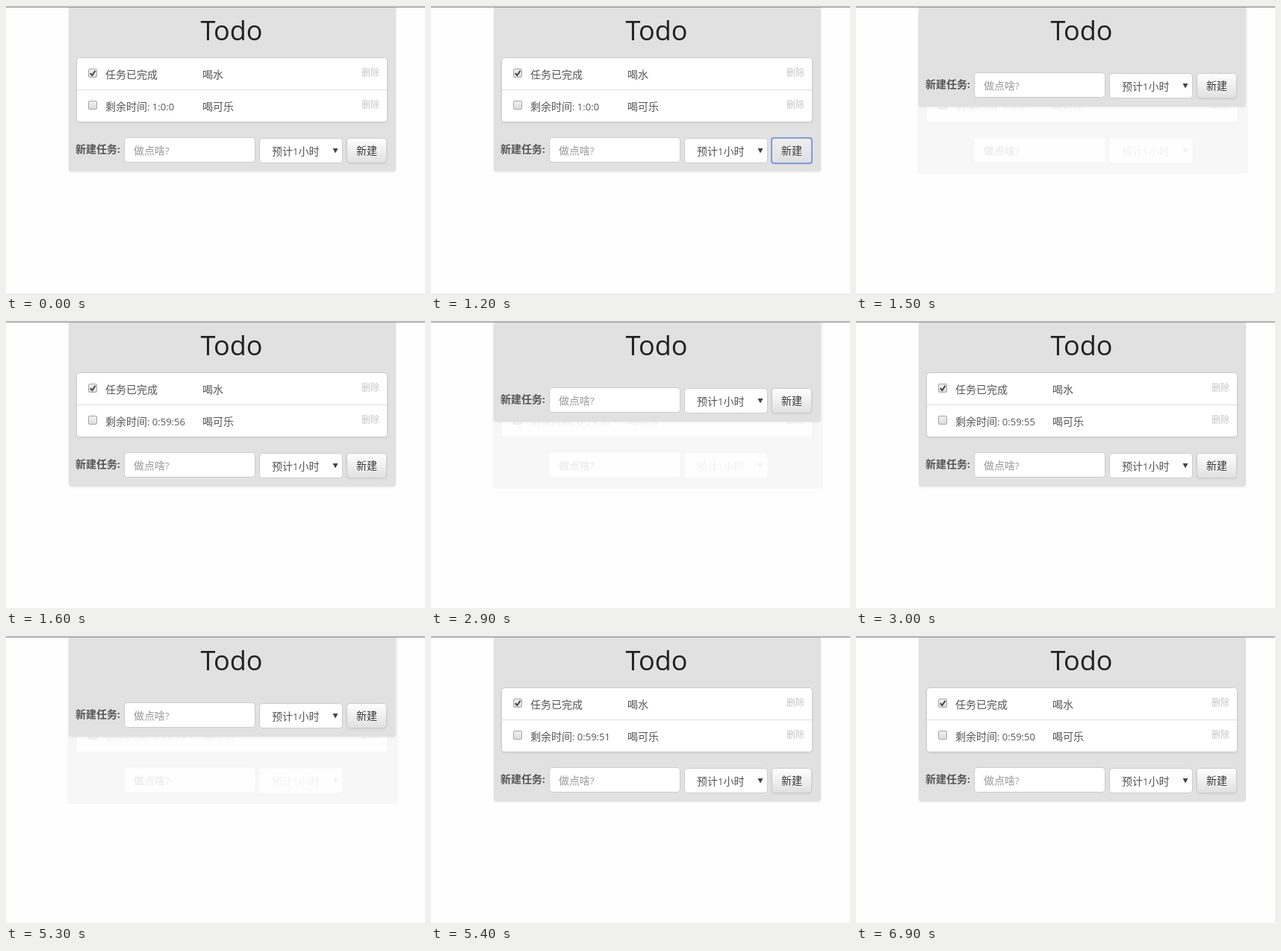
An HTML page that plays this animation: 561 by 385 pixels, repeating every 7800 ms.

```html
<!DOCTYPE html>
<html lang="zh-CN">
<head>
<meta charset="utf-8">
<title>Todo</title>
<style>
  html, body { margin: 0; width: 100%; height: 100%; overflow: hidden; background: #fefefe; }
  svg { display: block; width: 561px; height: 385px; }
  text { font: 14px "Noto Sans CJK SC", "Noto Sans CJK", sans-serif; fill: var(--ink, #555); white-space: pre; }
  .latin { font-family: "Open Sans", "Noto Sans", sans-serif; font-size: 13px; }
  .title { font: 500 36px "Open Sans", "Noto Sans", sans-serif; fill: #222; }
  .label { font-weight: 700; }
  .hint { fill: #999; }
  .delete { font-size: 12px; fill: #c4c4c4; }
  .new { fill: #333; text-shadow: 0 1px 0 #fff; }
  .box { fill: #fff; stroke: var(--line, #ccc); }
  .soft { filter: drop-shadow(0 1px 1px rgba(0, 0, 0, .08)); }
  #ghost { --line: none; --ink: #ccc; opacity: .23; }
</style>
</head>
<body>
<svg viewBox="0 0 561 385">
  <defs>
    <linearGradient id="shine" x2="0" y2="1">
      <stop stop-color="#fff"/><stop offset="1" stop-color="#e0e0e0"/>
    </linearGradient>
    <linearGradient id="tick-fill" x2="0" y2="1">
      <stop stop-color="#f0f0f0"/><stop offset="1" stop-color="#dcdcdc"/>
    </linearGradient>
    <rect id="checkbox" x="110.5" y="84.5" width="11" height="11" rx="1.5" fill="url(#tick-fill)" stroke="#a6a6a6"/>
  </defs>

  <g id="ghost">
    <rect x="82" y="2" width="443" height="223" rx="4" fill="#e1e1e1"/>
    <use href="#list"/>
    <use href="#field"/>
    <use href="#select"/>
  </g>

  <path id="card" class="soft" fill="#e1e1e1"/>
  <rect width="561" height="1" fill="#d8d8d8"/>
  <rect y="1" width="561" height="1" fill="#8c8c8c"/>
  <text class="title" x="302" y="46" text-anchor="middle">Todo</text>

  <g id="tasks">
    <g id="list">
      <rect class="box soft" x="94.5" y="69.5" width="416" height="86" rx="4" style="--line-color:#ddd"/>
      <path d="M95 112.5H510" stroke="var(--line, #ddd)"/>
      <use href="#checkbox"/>
      <use href="#checkbox" y="43"/>
      <path d="M112.8 90.2l2.6 2.8 4.2-6.2" fill="none" stroke="#444" stroke-width="2"/>
      <text x="133" y="97">任务已完成</text>
      <text x="263" y="97">喝水</text>
      <text class="delete" x="476" y="94">删除</text>
      <text x="133" y="140">剩余时间<tspan class="latin">: <tspan id="clock">1:0:0</tspan></tspan></text>
      <text x="263" y="140">喝可乐</text>
      <text class="delete" x="476" y="137">删除</text>
    </g>
  </g>

  <g id="form">
    <text class="label" x="93" y="197">新建任务<tspan class="latin">:</tspan></text>
    <g id="field">
      <rect class="box" x="158.5" y="176.5" width="175" height="33" rx="4"/>
      <text class="hint" x="171" y="199">做点啥<tspan class="latin">?</tspan></text>
    </g>
    <g id="select">
      <rect class="box" x="339.5" y="177.5" width="111" height="33" rx="4"/>
      <text x="356" y="200">预计<tspan class="latin">1</tspan>小时</text>
      <path d="M437.5 191h7l-3.5 6.5z" fill="var(--ink, #444)"/>
    </g>
    <rect class="soft" x="456.5" y="177.5" width="53" height="33" rx="4" fill="url(#shine)" stroke="#ccc"/>
    <g id="focus">
      <rect x="456" y="177" width="54" height="34" rx="3" fill="#e0e0e0" fill-opacity=".5" stroke="#7d9fdc" stroke-width="2"/>
    </g>
    <text class="new" x="469" y="199">新建</text>
  </g>
</svg>
<script>
  const LOOP = 7800;
  const ROWS_HEIGHT = 87;
  // Start time, remaining time; no remaining time means the list is reloading.
  const scenes = [
    [0, "1:0:0"], [1500], [1600, "0:59:56"], [2900], [3000, "0:59:55"],
    [5300], [5400, "0:59:51"], [6900, "0:59:50"]
  ];
  const el = id => document.getElementById(id);
  const show = (id, on) => el(id).setAttribute("display", on ? "inline" : "none");
  const start = performance.now();

  function draw(now) {
    const t = Math.max(0, now - start) % LOOP;
    const [, remaining] = scenes.findLast(([from]) => t >= from);
    const loaded = remaining !== undefined;
    const lift = loaded ? 0 : ROWS_HEIGHT;

    if (loaded) el("clock").textContent = remaining;
    show("tasks", loaded);
    show("ghost", !loaded);
    show("focus", t >= 1200 && t < 1500);
    el("form").setAttribute("transform", `translate(0 ${-lift})`);
    el("card").setAttribute("d", `M84 2H522V${218 - lift}q0 4-4 4H88q-4 0-4-4z`);
    requestAnimationFrame(draw);
  }
  draw(start);
</script>
</body>
</html>
```
